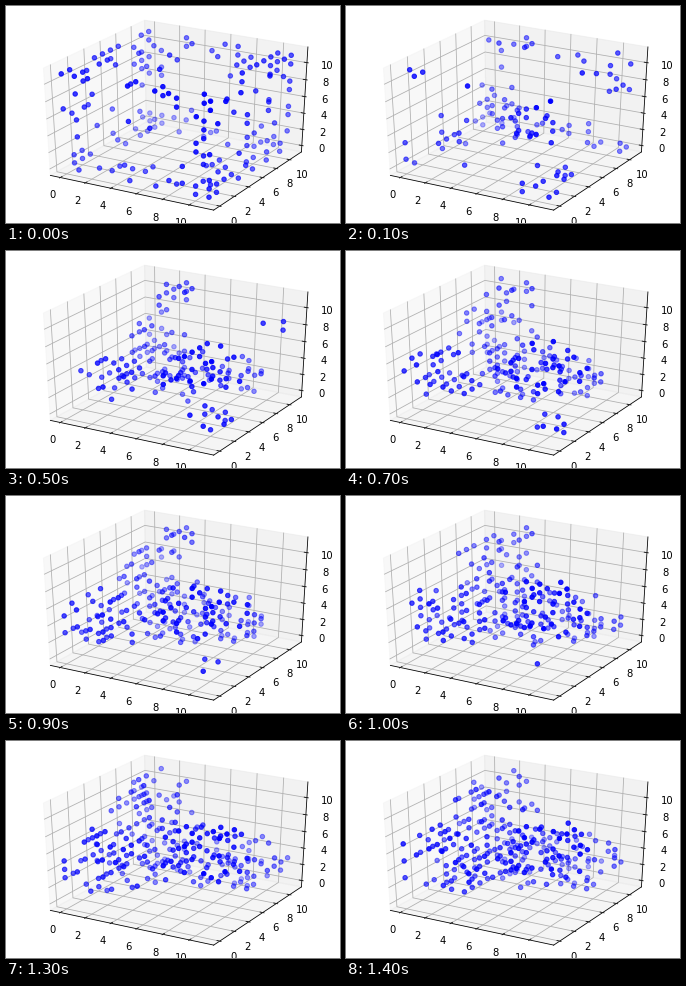
These frames come from a looping animation (334x217 px, 1.5 s). A matplotlib script:

```python
import numpy as np
import matplotlib.pyplot as plt
from matplotlib.animation import FuncAnimation

W, H, DPI = 334, 217, 72
FRAMES, STEP_MS = 15, 100
GRID = 12
LOW, SPAN = -0.55, 12.1            # data limits with a 5 % margin
EDGE = 0.5 + 1 / 48                # panes reach a little past the limits
LABEL_GAP = 1 / 12
DIST = 10
DENSITY = 0.3                      # share of living cells in a colony
SETTLED = 3                        # generation when the colonies are formed
TICKS = (np.arange(0, 11, 2) - LOW) / SPAN - 0.5

plt.rcParams["font.family"] = "DejaVu Sans"


def project(points):
    """Perspective view at elevation 30, azimuth -60; returns xy and distance."""
    x, y, z = np.moveaxis(np.asarray(points, float), -1, 0)
    c, s = np.sqrt(3) / 2, 0.5
    right = c * x + s * y
    up = -s * s * x + s * c * y + c * z
    dist = DIST - (c * s * x - c * c * y + s * z)
    return np.stack([right / dist, up / dist], -1), dist


# ---- colonies drift and grow or die out at a steady rate ----
class Colony:
    def __init__(self, start, end, size, growth):
        self.start, self.end = np.array(start), np.array(end)
        self.size, self.growth = size, growth

    def at(self, frame):
        age = max(0, frame - SETTLED)
        t = age / (FRAMES - 1 - SETTLED)
        centre = self.start + (self.end - self.start) * t
        count = max(0, self.size + self.growth * age) * min(1, frame / 2)
        return centre, int(round(count))


COLONIES = [
    Colony((3.2, 10, 10.5), (1.5, 9.5, 10), 12, 0),          # top
    Colony((10.5, 10, 8.5), (10.5, 10, 8.5), 11, -4),        # right
    Colony((10, 2.3, 0.5), (9.5, 2, 1.5), 15, -2),           # front
    Colony((2, 2, 4), (2, 2, 4.7), 16, 4.5),                 # left
    Colony((8.5, 3, 6), (8.5, 4, 6.5), 26, 2),               # core
    Colony((1.8, 9.5, 4.5), (2.3, 7.5, 8.3), 28, 2),         # back
    Colony((5, 7, 2.4), (5.5, 6.5, 4), 28, 4),               # middle
    Colony((8, 9.5, 1.5), (8.7, 9, 3), 11, 2.6),             # floor
]

CELLS = np.indices((GRID,) * 3).reshape(3, -1).T
OUTER = (np.abs(CELLS - (GRID - 1) / 2) > 4).sum(axis=1)
HABIT = np.random.default_rng(4).random(len(CELLS))


def living(frame):
    """Cells alive in a generation, as positions in the unit cube."""
    score = HABIT + np.random.default_rng(50 + frame).random(len(CELLS))
    alive = np.zeros(len(CELLS), bool)

    # the first soup favours the rim of the cube and dies quickly
    soup = int(190 * 0.25 ** frame)
    alive[np.argsort(score - 0.5 * OUTER)[:soup]] = True

    for colony in COLONIES:
        centre, count = colony.at(frame)
        radius = np.cbrt(3 * count / (4 * np.pi * DENSITY))
        away = np.linalg.norm(CELLS - centre, axis=1)
        inside = np.flatnonzero(away <= radius)
        ranked = inside[np.argsort(score[inside])]
        alive[ranked[:count]] = True
    return (CELLS[alive] - LOW) / SPAN - 0.5


# ---- static box ----
fig = plt.figure(figsize=(W / DPI, H / DPI), dpi=DPI, facecolor="white")
ax = fig.add_axes([0, -0.44 / H, 334.8 / W, 217.44 / H])
ax.set_xlim(-0.095, 0.09)
ax.set_ylim(-0.095, 0.09)
ax.axis("off")


def line(points, color, order):
    xy, _ = project(points)
    ax.plot(xy[:, 0], xy[:, 1], color=color, lw=0.8, zorder=order,
            scalex=False, scaley=False)


def spot(axis, value, others):
    """Point with `value` on one axis and `others` on the remaining two."""
    p = list(others)
    p.insert(axis, value)
    return p


def pane(axis, side, shade):
    ring = [(-EDGE, -EDGE), (EDGE, -EDGE), (EDGE, EDGE), (-EDGE, EDGE)]
    xy, _ = project([spot(axis, side, r) for r in ring])
    ax.add_patch(plt.Polygon(xy, facecolor=(shade,) * 3, alpha=0.5,
                             edgecolor=(shade,) * 3, lw=1, zorder=1))


pane(0, -EDGE, 0.95)
pane(1, EDGE, 0.90)
pane(2, -EDGE, 0.925)

FAR = (-EDGE, EDGE, -EDGE)         # the corner where the three panes meet


def draw_axis(axis, signs, tick_axis, order):
    """signs: on which side of the other two axes the axis line runs."""
    others = [i for i in range(3) if i != axis]
    edge = [s * EDGE for s in signs]
    back = [FAR[i] for i in others]
    line([spot(axis, -EDGE, edge), spot(axis, EDGE, edge)], "black", order)
    slot = others.index(tick_axis)
    for n, t in enumerate(TICKS):
        bends = [(-back[0], back[1]), back, (back[0], -back[1])]
        line([spot(axis, t, b) for b in bends], "#b0b0b0", order + 0.1)
        tick = []
        for reach in (0.1, -0.2):
            end = list(edge)
            end[slot] += signs[slot] * reach / 12
            tick.append(spot(axis, t, end))
        line(tick, "black", order + 0.2)
        (x, y), _ = project(
            spot(axis, t, [s * (EDGE + LABEL_GAP) for s in signs]))
        ax.text(x, y, str(2 * n), fontsize=10, color="black",
                ha="center", va="top", zorder=order + 0.3)


draw_axis(0, (-1, -1), 1, 2)
draw_axis(1, (1, -1), 0, 3)
draw_axis(2, (1, 1), 0, 4)

dots = ax.scatter([], [], s=20, linewidths=1, zorder=6)


def draw(frame):
    xy, dist = project(living(frame))
    depth = -1 / dist
    fade = (depth - depth.min()) / np.ptp(depth)
    rgba = np.zeros((len(xy), 4))
    rgba[:, 2] = 1
    rgba[:, 3] = 1 - 0.7 * fade
    dots.set_offsets(xy)
    dots.set_facecolor(rgba)
    dots.set_edgecolor(rgba)
    return [dots]


anim = FuncAnimation(fig, draw, frames=FRAMES, interval=STEP_MS,
                     repeat=True, repeat_delay=0)
plt.show()
```
